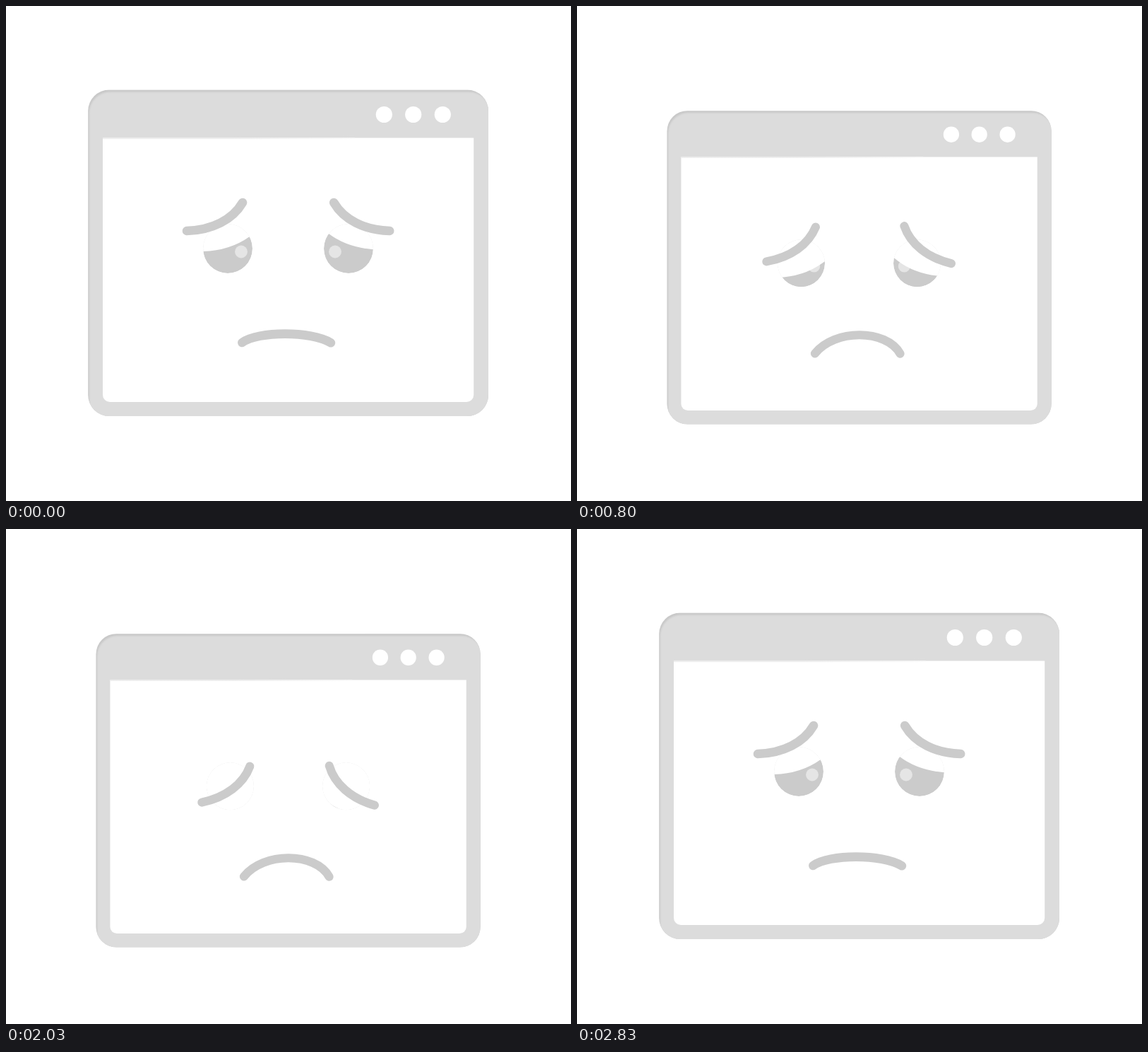
Animation of 800x700 px, one loop 3.03 s. Source, as an HTML page:

```html
<!DOCTYPE html>
<html lang="en">
<head>
<meta charset="utf-8">
<title>Sad window</title>
<style>
  html, body { margin: 0; width: 100%; height: 100%; overflow: hidden; background: #fff; }
  svg { display: block; width: 800px; height: 700px; }
  .line { fill: none; stroke: #cbcbcb; stroke-width: 12.6; stroke-linecap: round; }
  .eye { fill: #cbcbcb; }
  .glint { fill: #e5e5e5; }
  .lid { fill: #fff; }
</style>
</head>
<body>
<svg viewBox="0 0 800 700">
  <defs>
    <clipPath id="outer"><rect x="-283.3" y="-230.8" width="566.8" height="461.6" rx="30"/></clipPath>
    <filter id="soft" x="-5%" y="-5%" width="110%" height="110%"><feGaussianBlur stdDeviation="0.9"/></filter>
    <linearGradient id="fade" gradientUnits="userSpaceOnUse" x1="-262" y1="0" x2="95" y2="0">
      <stop offset="0.5" stop-color="#ededed"/><stop offset="1" stop-color="#fbfbfb"/>
    </linearGradient>
    <clipPath id="eyeL"><circle cx="-85.5" cy="-6.3" r="35"/></clipPath>
    <clipPath id="eyeR"><circle cx="85.5" cy="-6.3" r="35"/></clipPath>
  </defs>
  <g id="win">
    <g clip-path="url(#outer)">
      <rect x="-284" y="-231" width="568" height="462" fill="#c8c8c8"/>
      <rect x="-281.8" y="-227.8" width="568" height="470" rx="30" fill="#dcdcdc" filter="url(#soft)"/>
    </g>
    <path fill="#fff" d="M-262.5-162.8H262.7V200.7a10 10 0 0 1-10 10H-252.5a10 10 0 0 1-10-10Z"/>
    <rect x="-262.5" y="-162.8" width="357" height="1.6" fill="url(#fade)"/>
    <g fill="#fff">
      <circle cx="135.8" cy="-195.8" r="11.6"/>
      <circle cx="177.2" cy="-195.8" r="11.6"/>
      <circle cx="218.8" cy="-195.8" r="11.6"/>
    </g>
    <g clip-path="url(#eyeL)">
      <circle class="eye" cx="-85.5" cy="-6.3" r="35"/>
      <circle class="glint" cx="-66.5" cy="-1.8" r="8.9"/>
      <path class="lid" id="lidL" d="M-135-2.3H-120.5Q-82.5-3.3-54.5-23.3L-40.5-33.3V-120H-135Z"/>
    </g>
    <g clip-path="url(#eyeR)">
      <circle class="eye" cx="85.5" cy="-6.3" r="35"/>
      <circle class="glint" cx="66.5" cy="-1.8" r="8.9"/>
      <path class="lid" id="lidR" d="M135-5H120.5Q82.5-8.3 57.5-27.3L40-40.6V-120H135Z"/>
    </g>
    <path class="line" id="browL" d="M-39.5 20C-3.5 19 25.5 4 39.5-20"/>
    <path class="line" id="browR" d="M39.5 20C3.5 19-25.5 4-39.5-20"/>
    <path class="line" id="mouth"/>
  </g>
</svg>
<script>
const LOOP = 3030, STEP = 100 / 3;
const $ = id => document.getElementById(id);
const mix = (a, b, p) => a + (b - a) * p;
const place = (id, value) => $(id).setAttribute('transform', value);

// Each track is a list of [ms, value], eased in and out between neighbours.
const tracks = {
  y:      [[0, 349.3], [750, 370], [1320, 359.2], [2100, 370], [2540, 349.3]],
  sink:   [[0, 0], [750, 1], [2100, 1], [2540, 0]],
  tilt:   [[0, 0], [630, 10], [1260, 0], [2060, 10], [2830, 0]],
  drop:   [[440, 0], [1280, 1], [2000, 1], [2330, 0]],
  inward: [[440, 0], [1500, 1], [1960, 1], [2330, 0]]
};

function at(track, t) {
  if (t <= track[0][0]) return track[0][1];
  for (let i = 1; i < track.length; i++) {
    const [t0, a] = track[i - 1], [t1, b] = track[i];
    if (t < t1) {
      const u = (t - t0) / (t1 - t0);
      return mix(a, b, u * u * (3 - 2 * u));
    }
  }
  return track[track.length - 1][1];
}

function draw(t) {
  const v = {};
  for (const name in tracks) v[name] = at(tracks[name], t);

  place('win', `translate(399.5 ${v.y}) scale(${1 - 0.0397 * v.sink})`);

  const dyL = 43.5 * v.drop, dyR = 45.3 * v.drop;
  place('browL', `translate(${-104 + 13.5 * v.inward} ${-51.3 + dyL}) rotate(${-v.tilt})`);
  place('browR', `translate(${104.2 - 11.3 * v.inward} ${-51.3 + dyR}) rotate(${1.42 * v.tilt})`);
  place('lidL', `translate(0 ${dyL})`);
  place('lidR', `translate(0 ${dyR})`);

  const cy = mix(110.1, 90.3, v.sink);
  const x1 = mix(-42, -37, v.sink), x2 = mix(32, 40, v.sink);
  $('mouth').setAttribute('d', `M-65.2 126.7C${x1} ${cy} ${x2} ${cy} 60.5 127`);
}

const start = performance.now();
function tick() {
  const t = (performance.now() - start) % LOOP;
  // The motion runs at 30 pictures a second.
  draw(Math.floor((t + 4) / STEP) * STEP);
  requestAnimationFrame(tick);
}
tick();
</script>
</body>
</html>
```
